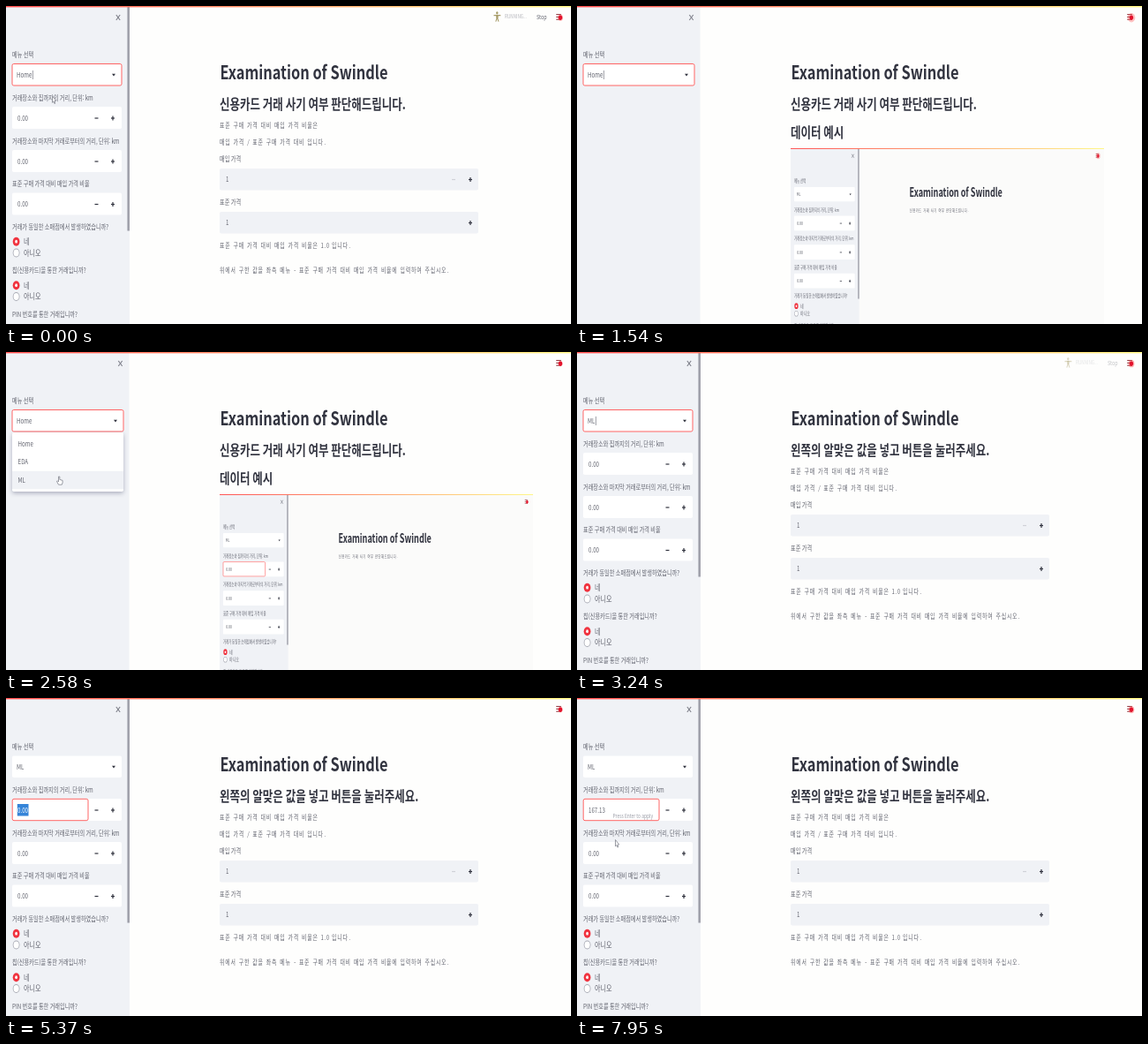
Write an HTML page with a canvas that moves like this. It is 640 px wide and 360 px high and loops after 8000 ms.

```html
<!DOCTYPE html>
<html lang="ko">
<head>
<meta charset="utf-8">
<style>
html, body { margin: 0; width: 100%; height: 100%; overflow: hidden; background: #fefefd; }
canvas { display: block; width: 640px; height: 360px; }
</style>
</head>
<body>
<canvas id="stage" width="640" height="360"></canvas>
<script>
const ctx = document.getElementById('stage').getContext('2d');
const LOOP = 8000;
// The page is a 1536 px wide view, squeezed into the stage.
const SX = 640 / 1536, SY = 0.525;
const SANS = '"Noto Sans CJK KR", "Noto Sans CJK JP", "Noto Sans CJK SC", sans-serif';
const MONO = '"Noto Sans Mono CJK KR", "Noto Sans CJK KR", "Noto Sans CJK JP", monospace';
const PAGE = '#fefefd', PANEL = '#f0f2f6', FIELD = '#ffffff';
const INK = '#31333f', SOFT = '#62646f', RED = '#ff6464';
const TITLE = 'Examination of Swindle';
const INTRO = '신용카드 거래 사기 여부 판단해드립니다.';
const HINT = '왼쪽의 알맞은 값을 넣고 버튼을 눌러주세요.';

const T = { home: 450, open: 2100, pick: 2720, ml: 2950, idle: 3420, drag: 3720, dragEnd: 3980 };
const KEYS = [[5500, '1'], [5950, '16'], [6350, '167'], [6900, '167.'], [7150, '167.1'], [7400, '167.13']];

const clamp = v => Math.max(0, Math.min(1, v));
const ease = v => { v = clamp(v); return v * v * (3 - 2 * v); };
const span = (t, a, b) => clamp((t - a) / (b - a));

function rect(x, y, w, h, color) {
  ctx.fillStyle = color;
  ctx.fillRect(x, y, w, h);
}

function oval(x, y, rx, ry, color) {
  ctx.beginPath();
  ctx.ellipse(x, y, rx, ry, 0, 0, 2 * Math.PI);
  ctx.fillStyle = color;
  ctx.fill();
}

function box(x, y, w, h, fill, border) {
  ctx.beginPath();
  ctx.roundRect(x, y, w, h, 1.8);
  ctx.fillStyle = fill;
  ctx.fill();
  if (!border) return;
  ctx.strokeStyle = border;
  ctx.lineWidth = 1;
  ctx.stroke();
}

function line(points, color, width) {
  ctx.beginPath();
  points.forEach(([x, y], i) => i ? ctx.lineTo(x, y) : ctx.moveTo(x, y));
  ctx.strokeStyle = color;
  ctx.lineWidth = width;
  ctx.stroke();
}

// Text centred vertically on y; returns its width on the stage.
function text(s, x, y, size = 14.8, color = SOFT, weight = 400) {
  ctx.save();
  ctx.translate(x, y + 0.37 * size * SY);
  ctx.scale(SX, SY);
  ctx.font = `${weight} ${size}px ${SANS}`;
  ctx.fillStyle = color;
  ctx.fillText(s, 0, 0);
  const w = ctx.measureText(s).width * SX;
  ctx.restore();
  return w;
}

// Fixed-pitch text: Hangul takes two cells, everything else one.
function mono(s, x, y) {
  const cell = 7.44;
  ctx.save();
  ctx.translate(x, y + 5.3 * SY);
  ctx.scale(SX, SY);
  ctx.font = `400 14.2px ${MONO}`;
  ctx.fillStyle = SOFT;
  let at = 0;
  for (const ch of s) {
    ctx.fillText(ch, at, 0);
    at += ch >= '가' ? 2 * cell : cell;
  }
  ctx.restore();
}

function minus(x, y, color = INK) { line([[x - 2, y], [x + 2, y]], color, 1.2); }

function plus(x, y) {
  minus(x, y);
  line([[x, y - 2.4], [x, y + 2.4]], INK, 1.2);
}

function cross(x) {
  line([[x - 2.2, 10], [x + 2.2, 16]], '#7d7f8a', 1.1);
  line([[x + 2.2, 10], [x - 2.2, 16]], '#7d7f8a', 1.1);
}

function textCaret(x, y) { rect(x, y - 5, 0.6, 10, SOFT); }

function select(value, right, border, caret) {
  text('메뉴 선택', 7, 55);
  box(7, 65.5, right - 7, 24.5, FIELD, border);
  const w = text(value, 12, 78);
  if (caret) textCaret(12.6 + w, 78);
  const x = right - 9;
  ctx.beginPath();
  ctx.moveTo(x - 2, 76.8);
  ctx.lineTo(x + 2, 76.8);
  ctx.lineTo(x, 79.4);
  ctx.fillStyle = INK;
  ctx.fill();
}

function numberField(label, y, o = {}) {
  text(label, 7, y);
  box(7, y + 10, 124, 25, FIELD);
  if (o.focus) box(7.2, y + 10.3, 85.8, 24.4, FIELD, RED);
  const value = o.value ?? '0.00', mid = y + 23;
  const w = text(value, 13, mid);
  if (o.selected > 0) {
    const from = 25.5 - 12.7 * o.selected;
    rect(from, mid - 7, 25.5 - from, 13.5, '#3584d8');
    ctx.save();
    ctx.beginPath();
    ctx.rect(from, mid - 7, 25.5 - from, 13.5);
    ctx.clip();
    text(value, 13, mid, 14.8, '#ffffff');
    ctx.restore();
  }
  if (o.caret) textCaret(13.4 + w, mid);
  if (o.hint) text('Press Enter to apply', 40.5, mid + 6.5, 11.8, '#9a9ca6');
  minus(102.5, mid);
  plus(121, mid);
}

function radio(label, y, on) {
  oval(11.6, y, 3.9, 5, on ? '#f0333f' : '#a9abb5');
  oval(11.6, y, on ? 1.4 : 3.1, on ? 1.9 : 4.1, '#ffffff');
  text(label, 20, y, 17);
}

function yesNo(label, y) {
  text(label, 7, y);
  radio('네', y + 16.7, true);
  radio('아니오', y + 29.5, false);
}

function sidebarML(o) {
  rect(0, 0, 140, 360, PANEL);
  rect(137.4, 1, 2.6, 253.5, '#a0a1ab');
  cross(127);
  select(o.menu, 131, o.menuBorder, o.menuCaret);
  numberField('거래장소와 집까지의 거리, 단위: km', 104, o.input);
  numberField('거래장소와 마지막 거래로부터의 거리, 단위: km', 153);
  numberField('표준 구매 가격 대비 매입 가격 비율', 201.5);
  yesNo('거래가 동일한 소매점에서 발생하였습니까?', 250);
  yesNo('칩(신용카드)을 통한 거래입니까?', 299.5);
  text('PIN 번호를 통한 거래입니까?', 7, 349.5);
}

function priceField(label, y, faded) {
  text(label, 242, y);
  box(242, y + 10.5, 293, 24.5, PANEL);
  text('1', 249, y + 23);
  if (faded) minus(507, y + 23, '#cfd1d8');
  plus(526, y + 23);
}

function mainML(heading) {
  text(heading, 242, 111, 30, INK, 700);
  mono('표준 구매 가격 대비 매입 가격 비율은', 242, 135);
  mono('매입 가격 / 표준 구매 가격 대비 입니다.', 242, 154.5);
  priceField('매입 가격', 173.5, true);
  priceField('표준 가격', 222.5, false);
  mono('표준 구매 가격 대비 매입 가격 비율은 1.0 입니다.', 242, 271.5);
  mono('위에서 구한 값을 좌측 메뉴 - 표준 구매 가격 대비 매입 가격 비율에 입력하여 주십시오.', 242, 299);
}

function topBar() {
  const g = ctx.createLinearGradient(0, 0, 640, 0);
  g.addColorStop(0, '#ff4b4b');
  g.addColorStop(0.4, '#ff8a62');
  g.addColorStop(1, '#fff680');
  rect(0, 0, 640, 1.4, g);
}

// Menu icon with the pulsing recording dot.
function burger(t) {
  const pulse = 0.5 - 0.5 * Math.cos(2 * Math.PI * (t - 2580) / 3000);
  for (const y of [9.6, 12.4, 15.2]) rect(623.2, y - 0.5, 5.6, 1, '#8c2f38');
  oval(628, 13.2, 2.4 + 2.4 * pulse, 3 + 2.8 * pulse, `rgba(255,75,75,${0.5 - 0.2 * pulse})`);
  oval(628, 13.2, 2.1, 2.7, '#e3122c');
}

function running(alpha) {
  if (alpha <= 0) return;
  ctx.save();
  ctx.globalAlpha = alpha;
  const c = '#a79c68';
  oval(556.3, 7.8, 1.2, 1.6, c);
  line([[552.5, 10.6], [560.3, 10.6]], c, 1.3);
  line([[556.4, 10], [556.4, 13.6]], c, 2.4);
  line([[554.8, 17.6], [556.4, 12.8], [558, 17.6]], c, 1.1);
  text('RUNNING...', 565, 12, 11.2, '#b4b5bb');
  text('Stop', 601, 12, 13, SOFT);
  ctx.restore();
}

function page(color = PAGE) {
  rect(0, 0, 640, 360, color);
  text(TITLE, 242.5, 75, 39.3, INK, 700);
}

// Recorded demo of the app, embedded in the home page.
function demo(t) {
  ctx.save();
  ctx.beginPath();
  ctx.rect(242, 161, 355, 199);
  ctx.clip();
  ctx.translate(242, 161);
  ctx.scale(355 / 640, 0.67);
  page('#fbfbfa');
  mono(INTRO, 243, 104.5);
  sidebarML({ menu: 'ML', input: { focus: t >= 2100 } });
  topBar();
  burger(t);
  ctx.restore();
}

function menu(hover) {
  ctx.save();
  ctx.shadowColor = 'rgba(50,52,90,.35)';
  ctx.shadowBlur = 5;
  ctx.shadowOffsetY = 2;
  box(7, 91, 126, 67, FIELD);
  ctx.restore();
  ['Home', 'EDA', 'ML'].forEach((item, i) => {
    const y = 104 + i * 20.4;
    if (i === hover) rect(7, y - 10, 126, 20.4, PANEL);
    text(item, 13.5, y);
  });
}

function shape(x, y, points) {
  ctx.beginPath();
  points.forEach(([px, py], i) => i ? ctx.lineTo(x + px, y + py) : ctx.moveTo(x + px, y + py));
  ctx.closePath();
  ctx.fillStyle = '#ffffff';
  ctx.fill();
  ctx.strokeStyle = '#82848f';
  ctx.lineWidth = 0.8;
  ctx.lineJoin = 'round';
  ctx.stroke();
}

function arrow(x, y) {
  shape(x, y, [[0, 0], [0, 7.4], [1.4, 6], [2.4, 8.6], [3.3, 8.1], [2.4, 5.6], [4.2, 5.4]]);
}

function hand(x, y) {
  shape(x, y, [[0, 0], [1.3, 0], [1.3, 3.4], [4.6, 4.4], [4.6, 7], [3.8, 9.2], [0, 9.2], [-2, 5.4], [-1.2, 4.8], [0, 6]]);
}

function move(t, a, b, from, to) {
  const k = ease(span(t, a, b));
  return [from[0] + (to[0] - from[0]) * k, from[1] + (to[1] - from[1]) * k];
}

function pointer(t) {
  if (t < 870) arrow(52.5, 102);
  else if (t >= 1780 && t < 2150) arrow(...move(t, 1780, 2080, [54, 106], [62, 79]));
  else if (t >= 2150 && t < 2900) hand(...move(t, 2150, 2480, [62, 79], [59.5, 141]));
  else if (t >= 3460 && t < T.drag) arrow(...move(t, 3460, T.drag, [59.5, 141], [27, 126]));
  else if (t >= T.drag && t < 4250) arrow(...move(t, T.drag, T.dragEnd, [27, 126], [-0.5, 133]));
  else if (t >= 7560) arrow(...move(t, 7560, 7880, [12, 138], [43.5, 160.5]));
}

function drawHome(t, caret) {
  text(INTRO, 242, 111, 30, INK, 700);
  text('데이터 예시', 242, 143, 30, INK, 700);
  demo(t);
  rect(0, 0, 139.5, 360, PANEL);
  cross(129.5);
  const open = t >= T.open && t < T.pick;
  select(t < T.pick ? 'Home' : 'ML', 133, RED, caret && !open);
  if (open) menu(t < 2300 ? 0 : t < 2400 ? 1 : 2);
}

function drawML(t, caret) {
  const leaving = t < T.home;
  mainML(leaving ? INTRO : HINT);
  const focus = t >= T.drag;
  let value = '0.00';
  for (const [at, s] of KEYS) if (t >= at) value = s;
  const typed = t >= KEYS[0][0];
  sidebarML({
    menu: leaving ? 'Home' : 'ML',
    menuBorder: focus ? null : RED,
    menuCaret: caret && !focus,
    input: {
      focus, value,
      selected: focus && !typed ? ease(span(t, T.drag, T.dragEnd)) : 0,
      caret: typed && t < 7500 && (t - 6350) % 1060 < 530,
      hint: typed
    }
  });
}

function draw(t) {
  const caret = t % 1060 < 530;
  page();
  if (t >= T.home && t < T.ml) drawHome(t, caret);
  else drawML(t, caret);
  topBar();
  if (t < T.pick) running(1 - span(t, T.home, 800));
  else running(t < T.ml ? span(t, T.pick, T.ml) : 1 - span(t, T.ml, T.idle));
  burger(t);
  pointer(t);
}

function tick() {
  draw(performance.now() % LOOP);
  requestAnimationFrame(tick);
}
tick();
</script>
</body>
</html>
```
